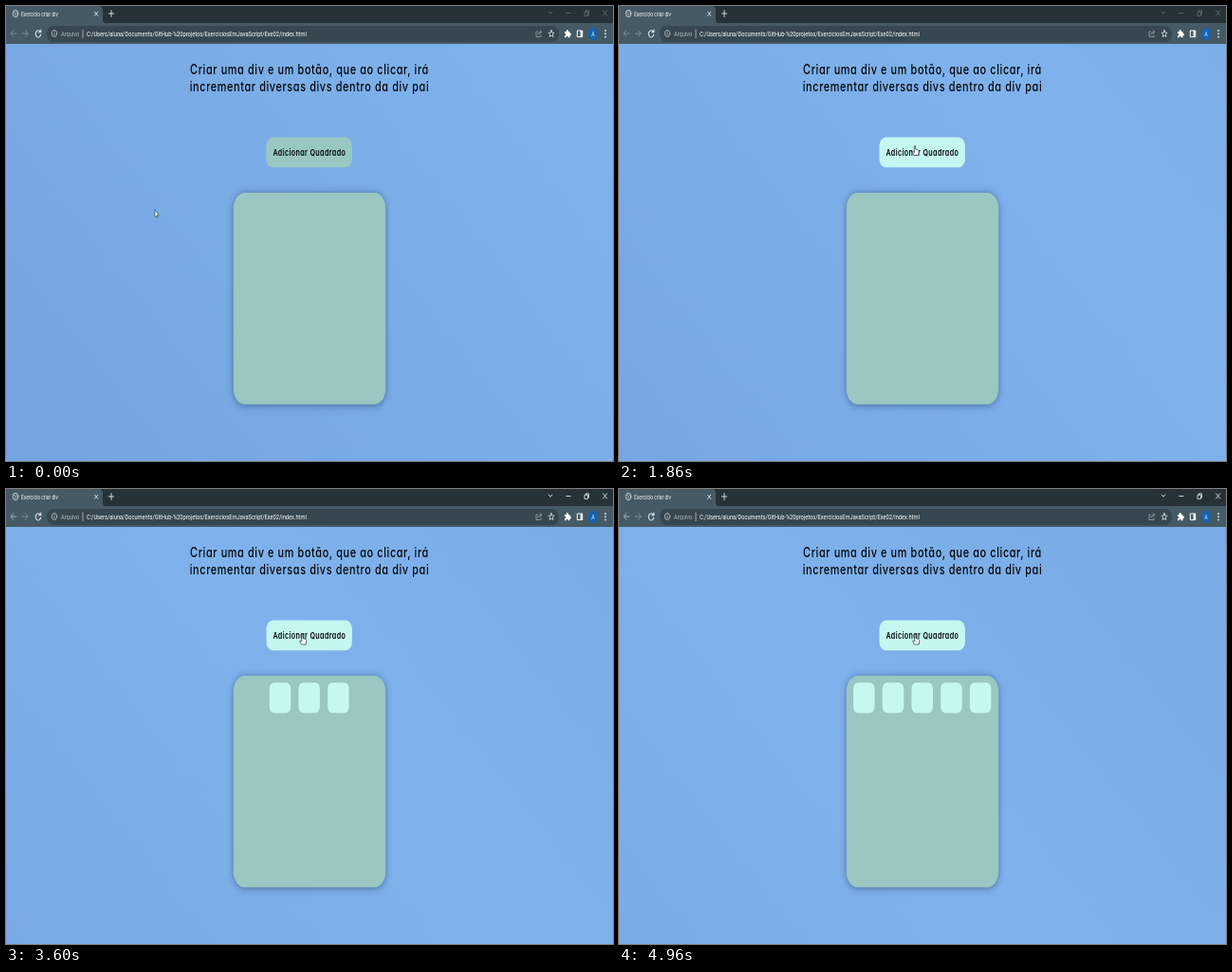
Animation of 640 by 480 pixels, one loop 5 s. Source, as an HTML page:

```html
<!DOCTYPE html>
<html lang="pt">
<head>
<meta charset="utf-8">
<title>Exercício criar div</title>
<style>
  html, body { margin: 0; width: 100%; height: 100%; overflow: hidden; background: #7aade7; }
  svg { display: block; width: 640px; height: 480px; }
  .ui { font-family: Roboto, "Open Sans", sans-serif; }
  .page { font-family: Inter, Lato, sans-serif; font-feature-settings: "cv11"; text-anchor: middle; fill: #04070a; }
  .line { fill: none; stroke-linecap: round; stroke-linejoin: round; }
</style>
</head>
<body>
<svg id="stage" viewBox="0 0 640 480">
  <defs>
    <linearGradient id="sky" gradientUnits="userSpaceOnUse">
      <stop offset="0" stop-color="#74a4df"/>
      <stop offset=".5" stop-color="#7fb2ec"/>
      <stop offset="1" stop-color="#74a5e0"/>
    </linearGradient>
    <filter id="soft" x="-15%" y="-15%" width="130%" height="130%">
      <feGaussianBlur stdDeviation="3.2 4.2"/>
    </filter>
  </defs>

  <rect y="40" width="640" height="440" fill="url(#sky)"/>

  <!-- Browser frame -->
  <rect width="640" height="19" fill="#263238"/>
  <path d="M0 0H98Q102 0 102 5V15Q102 18 105 18H640V40H0Z" fill="#455a64"/>
  <rect x="43" y="21" width="540" height="17" rx="6.5" ry="8.5" fill="#37474f"/>

  <g class="line" stroke="#dfe6e9" stroke-width=".9">
    <ellipse cx="10" cy="8" rx="2.8" ry="3.7" stroke="#c3ccd0"/>
    <path d="M8 6L10 7.5L9.4 10M10.5 5L12.3 8L11 10.5" stroke="#c3ccd0" stroke-width=".7"/>
    <path d="M93.6 6.2L96.8 10.2M96.8 6.2L93.6 10.2M108.4 8H113.6M111 4.6V11.4"/>
    <path d="M22.8 29H17.4M20.6 25.8L23 29L20.6 32.2" stroke="#80929a"/>
    <path d="M36 27A2.7 3.6 0 1 0 36.6 30.2M36.8 25V27.7H34.6" stroke-width="1.1"/>
    <g stroke="#aab6bb">
      <ellipse cx="51" cy="29" rx="2.7" ry="3.5"/>
      <path d="M51 28.7V30.8M51 27V27.1M81 25V33.5"/>
      <path d="M560.5 27H559V32.5H564V31M560.7 30Q561 27.3 564.5 27.3M563 25.5L565 27.3L563 29.2" stroke="#8e9ba1"/>
    </g>
    <path d="M575 25.5L575.9 28.1L578 28.2L576.4 29.9L576.9 32.5L575 31.1L573.1 32.5L573.6 29.9L572 28.2L574.1 28.1Z" stroke-width=".8"/>
    <rect x="602.7" y="26" width="5" height="6.6" stroke="#fff" stroke-width="1"/>
  </g>
  <path d="M589 27H590.7Q590.5 24.9 591.8 24.9T593 27H594.5V28.7Q596 28.6 596 30T594.5 31.2V33.2H592.7Q592.5 31.5 591.7 31.5T590.6 33.2H589V31.2Q590.5 31 590.5 30T589 28.8Z M605.6 26H607.7V32.6H605.6Z" fill="#fff"/>
  <ellipse cx="619" cy="29.3" rx="5" ry="6.6" fill="#1564b3"/>
  <g fill="#eef2f3">
    <ellipse cx="632" cy="26" rx=".8" ry="1"/>
    <ellipse cx="632" cy="29.3" rx=".8" ry="1"/>
    <ellipse cx="632" cy="32.6" rx=".8" ry="1"/>
  </g>
  <path id="back" class="line" stroke-width=".9" d="M10.8 29H5.2M7.6 25.8L5.2 29L7.6 32.2"/>
  <path id="controls" class="line" stroke-width=".9" d="M572.2 6L574 8.2L575.8 6M590.8 7.5H595.2M610.4 6.2H613.4V10.4H610.4ZM611.4 6V4.8H614.4V9H613.5M629.6 4.8L633.6 10M633.6 4.8L629.6 10"/>

  <!-- Page -->
  <rect x="240" y="198" width="160" height="223" rx="12" ry="16" fill="#22406b" opacity=".62" filter="url(#soft)"/>
  <rect x="239.8" y="197" width="160.4" height="223.3" rx="12" ry="16" fill="#99c7c2"/>
  <rect id="button" x="274.5" y="138.5" width="90.4" height="31.8" rx="7" ry="9"/>
  <g id="squares" fill="#c6f8f2"></g>
  <g id="labels"></g>

  <path id="arrow" d="M0 0V7.6L1.3 6.4L2.2 8.8L3.2 8.2L2.3 6H4.1Z" fill="#fff" stroke="#26343f" stroke-width=".6"/>
  <path id="hand" d="M-.7 .6Q0 -.6 .7 .6V4L3.6 5Q4.4 5.4 4.2 7L3.6 10.6H-.9L-3 6.9Q-2.6 5.8 -1.5 6.8L-.7 7.6Z" fill="#f7ffff" stroke="#26343f" stroke-width=".7"/>
</svg>
<script>
const LOOP = 5000;
const SQUEEZE = 0.75;
const HOVER_FROM = 1690;
const CLICKS = [2350, 2900, 3450, 4000, 4550];
const PATH = [
  [0, 157, 214.8], [950, 157, 214.8], [1130, 177, 200.5],
  [1450, 245, 172], [1750, 312, 147], [1900, 312, 147],
  [2120, 312.5, 153.5], [LOOP, 312.5, 153.5]
];

const $ = id => document.getElementById(id);

function add(parent, tag, attrs, content = '') {
  const node = document.createElementNS('http://www.w3.org/2000/svg', tag);
  for (const key in attrs) node.setAttribute(key, attrs[key]);
  node.textContent = content;
  parent.append(node);
  return node;
}

function label(x, y, size, content, attrs) {
  add($('labels'), 'text', {
    transform: `translate(${x} ${y}) scale(${SQUEEZE} 1)`,
    'font-size': size, ...attrs
  }, content);
}

const ui = fill => ({ class: 'ui', fill });
const page = (weight, spacing) => ({ class: 'page', 'font-weight': weight, 'letter-spacing': spacing });

label(16, 10.6, 6.66, 'Exercício criar div', ui('#f0f4f5'));
label(58, 32.2, 7.6, 'Arquivo', ui('#aab6bb'));
label(85, 32.2, 7.6, 'C:/Users/aluna/Documents/GitHub-%20projetos/ExerciciosEmJavaScript/Exe02/index.html', ui('#fff'));
label(619, 31.8, 7, 'A', { ...ui('#e4eef8'), 'text-anchor': 'middle' });
label(320, 72.4, 14.5, 'Criar uma div e um botão, que ao clicar, irá', page(500, 0.84));
label(320, 90, 14.5, 'incrementar diversas divs dentro da div pai', page(500, 0.84));
label(319.8, 157.7, 9.5, 'Adicionar Quadrado', page(600, 0.53));

const squares = CLICKS.map(() =>
  add($('squares'), 'rect', { y: 204.2, width: 22.5, height: 32, rx: 5, ry: 6.5 }));

function pointerAt(t) {
  const i = PATH.findIndex(([time]) => time > t);
  const [t0, x0, y0] = PATH[i - 1];
  const [t1, x1, y1] = PATH[i];
  const k = (t - t0) / (t1 - t0);
  return [x0 + (x1 - x0) * k, y0 + (y1 - y0) * k];
}

function show(node, visible) {
  node.setAttribute('display', visible ? 'inline' : 'none');
}

function render(t) {
  // The page gradient slides slowly towards the lower left.
  const drift = t / LOOP * 300;
  const sky = $('sky');
  sky.setAttribute('x1', -drift);
  sky.setAttribute('y1', 480 + drift * 0.79);
  sky.setAttribute('x2', 1120 - drift);
  sky.setAttribute('y2', -405 + drift * 0.79);

  const hover = t >= HOVER_FROM;
  $('button').setAttribute('fill', hover ? '#c5f7f1' : '#99c8c2');

  const [x, y] = pointerAt(t);
  for (const id of ['arrow', 'hand']) {
    $(id).setAttribute('transform', `translate(${x} ${y})`);
    show($(id), (id === 'hand') === hover);
  }

  const count = CLICKS.filter(time => t >= time).length;
  squares.forEach((square, i) => {
    square.setAttribute('x', 319.7 - 11.25 + (i - (count - 1) / 2) * 30.7);
    show(square, i < count);
  });

  // The window gains focus with the first click.
  $('controls').setAttribute('stroke', count ? '#dbe2e5' : '#5f6d73');
  $('back').setAttribute('stroke', count ? '#a9b8c4' : '#80929a');
}

const start = performance.now();
function tick() {
  render((performance.now() - start) % LOOP);
  requestAnimationFrame(tick);
}
tick();
</script>
</body>
</html>
```
